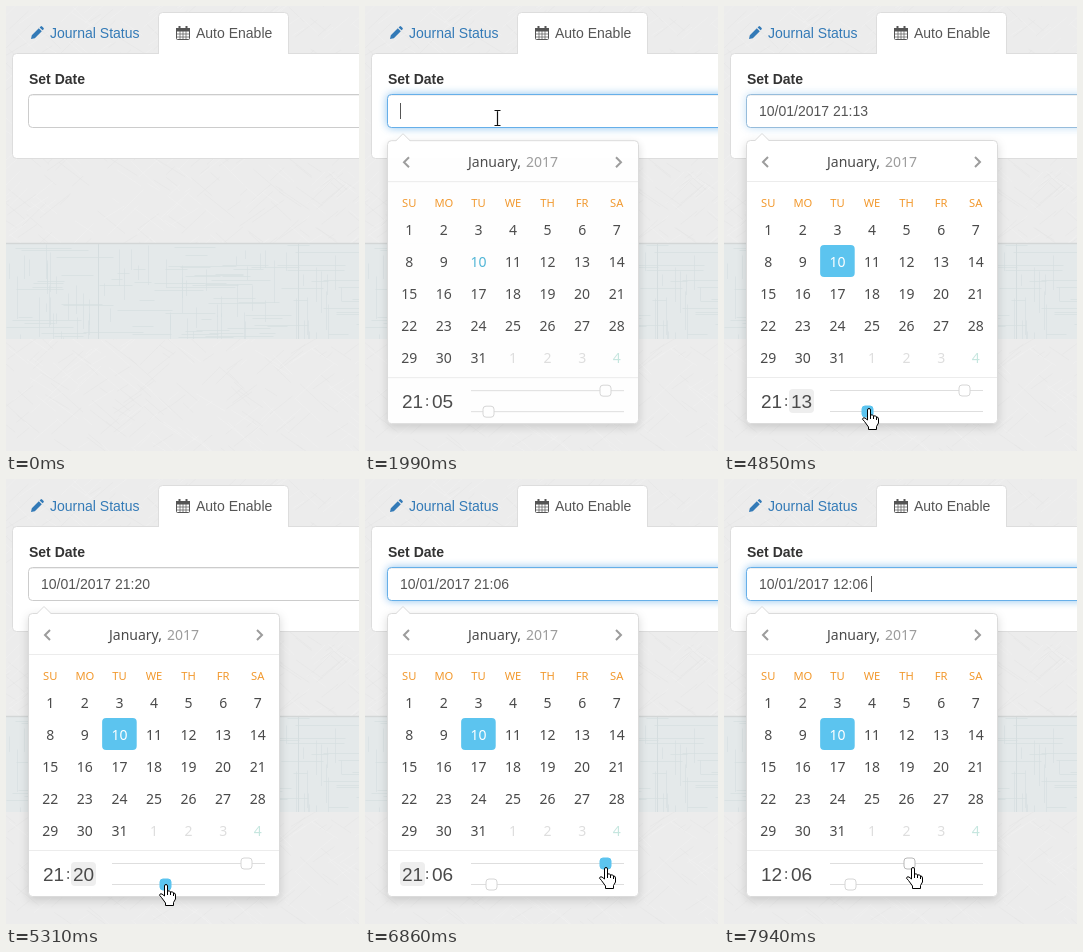
Write an HTML page that moves like this. It is 353 px wide and 445 px high and loops after 8000 ms.

```html
<!DOCTYPE html>
<html lang="en">
<head>
<meta charset="utf-8">
<title>Date picker</title>
<style>
html, body { margin: 0; width: 100%; height: 100%; overflow: hidden; background: #ececec; }
svg { display: block; font: 14px "Liberation Sans", Arial, sans-serif; }
.cal { font-family: "Noto Sans", "Open Sans", sans-serif; fill: #4a4a4a; }
.card { fill: #fff; stroke: #dbdbdb; filter: drop-shadow(0 3px 5px rgba(0,0,0,.15)); }
.glow { fill: #fff; stroke: #66afe9; filter: drop-shadow(0 0 4px rgba(102,175,233,.75)); }
.time { font: 19px "Liberation Sans", Arial, sans-serif; }
.mid { text-anchor: middle; }
.week { font-size: 11.2px; fill: #f2982c; }
</style>
</head>
<body>
<svg id="stage" width="353" height="445" viewBox="0 0 353 445"></svg>
<script>
const LOOP = 8000, CELL_W = 34.57, CELL_H = 32, GRID_X = 27, GRID_Y = 207;
const BLUE = '#5cc4ef';
const MINUTE_STEP = 141 / 59, HOUR_STEP = 141 / 23, TRACK = 112;
const SHOW = 1760, PICK = 4120;
const MINUTE_DRAG = [4780, 5770], HOUR_DRAG = [6860, 7790];

// time, x, y of the pointer's hot spot
const PATH = [
  [670, 183, 251], [820, 151, 157], [900, 151, 157], [1210, 132, 112],
  [2380, 132, 112], [2760, 150, 222], [3700, 150, 222], [3770, 151, 236],
  [4000, 112, 256], [4170, 112, 256], [4460, 127, 408], [4720, 127, 408],
  [4780, 133, 406], [4850, 144, 402], [5110, 185, 402], [5540, 127, 408],
  [5880, 127, 408], [6160, 200, 387], [6240, 200, 387], [6460, 238, 390],
  [6570, 238, 390], [6630, 240, 388], [6860, 240, 388], [7470, 188, 388]
];

let seed = 11;
const random = () => (seed = seed * 16807 % 2147483647) / 2147483647;
const clamp = (v, lo = 0, hi = 1) => Math.min(hi, Math.max(lo, v));
const ramp = (t, start, length) => clamp((t - start) / length);
const within = (t, [start, end]) => t >= start && t < end;
const pad = n => String(n).padStart(2, '0');
const text = (x, y, s, attrs = '') => `<text x="${x}" y="${y}" ${attrs}>${s}</text>`;
const rect = (x, y, w, h, attrs) => `<rect x="${x}" y="${y}" width="${w}" height="${h}" ${attrs}/>`;
const line = (d, color, attrs = '') => `<path d="${d}" fill="none" stroke="${color}" ${attrs}/>`;

function paper(color) {
  let d = '';
  for (let i = 0; i < 420; i++) {
    const len = 6 + random() * 26, dir = random() < .5 ? -1 : 1;
    d += `M${(random() * 380 - 15).toFixed(1)} ${(random() * 445).toFixed(1)}` +
         `l${len.toFixed(1)} ${(dir * len * (.6 + random() * .4)).toFixed(1)}`;
  }
  return line(d, color, 'opacity=".5"');
}

function linen() {
  let d = '';
  for (let i = 0; i < 150; i++) {
    const x = Math.floor(random() * 353) + .5, y = Math.floor(238 + random() * 94) + .5;
    d += random() < .5 ? `M${x} ${y}h${Math.floor(10 + random() * 60)}`
                       : `M${x} ${y}V${Math.min(333, Math.floor(y + 8 + random() * 35))}`;
  }
  return rect(0, 237, 353, 96, 'fill="#e4e9ea"') + line(d, '#d6dfe1', 'opacity=".65"') +
    line('M92.5 238v95M292.5 238v95', '#d5dddf') + line('M0 237.5h353', '#d3d6d6', 'stroke-width="1.5"');
}

function page() {
  return rect(0, 0, 353, 445, 'fill="#ececec"') + paper('#e4e4e4') + paper('#f2f2f2') + linen() +
    rect(6.5, 47.5, 380, 105, 'rx="4" fill="#fff" stroke="#ddd"') +
    '<path d="M152.5 48.5V10.5q0-4 4-4h122q4 0 4 4v38" fill="#fff"/>' +
    line('M152.5 48V10.5q0-4 4-4h122q4 0 4 4V48', '#ddd') +
    '<path d="M25 33l.8-3.8 7-7 3 3-7 7zM33.6 21.4l1-1q.8-.6 1.5 0l1.5 1.5q.6.7 0 1.4l-1 1z" fill="#337ab7"/>' +
    text(44, 32, 'Journal Status', 'fill="#337ab7"') +
    rect(170.5, 22.5, 13, 11, 'rx="1" fill="none" stroke="#555"') +
    rect(170, 22, 14, 3.5, 'fill="#555"') + rect(172.5, 20, 2, 4, 'fill="#555"') + rect(179.5, 20, 2, 4, 'fill="#555"') +
    line('M174 25v9M177 25v9M180 25v9M170 28h14M170 31h14', '#555', 'stroke-width=".7"') +
    text(190, 32, 'Auto Enable', 'fill="#555"') +
    text(23, 78, 'Set Date', 'fill="#333" font-weight="bold"') +
    rect(22.5, 88.5, 400, 33, 'rx="4" fill="#fff" stroke="#ccc"') +
    rect(22.5, 88.5, 400, 33, 'rx="4" class="glow" id="glow"') +
    line('M25 89.5h340', '#000', 'opacity=".06"') +
    text(35, 110, '', 'fill="#555" id="value"') + line('M0 97v16', '#555', 'id="caret"');
}

function calendar() {
  let days = '';
  for (let i = 0; i < 35; i++) {
    const x = GRID_X + CELL_W * (i % 7 + .5), y = GRID_Y + 22 + CELL_H * Math.floor(i / 7);
    const fill = i === 34 ? '#c6e6df' : i > 30 ? '#dedede' : '#4a4a4a';
    days += text(x, y, i > 30 ? i - 30 : i + 1, `class="mid" fill="${fill}" id="day${i}"`);
  }
  const week = ['SU', 'MO', 'TU', 'WE', 'TH', 'FR', 'SA']
    .map((d, i) => text(GRID_X + CELL_W * (i + .5), 201, d, 'class="mid week"')).join('');
  const cell = id => rect(0, 0, CELL_W, CELL_H, `rx="4" id="${id}"`);
  const knob = id => rect(-5.5, -5.5, 11, 11, `rx="3" id="${id}"`);
  return '<g class="cal" id="cal">' +
    rect(22.5, 134.5, 251, 283, 'rx="4" class="card"') +
    '<path d="M31 135l7-7 7 7v1H31z" fill="#fff"/>' + line('M31 134.5l7-7 7 7', '#dbdbdb') +
    line('M23 175.5h250M23 371.5h250', '#ececec') +
    line('M44 151l-5 5 5 5M251 151l5 5-5 5', '#9c9c9c', 'stroke-width="2"') +
    text(103, 161, 'January,') + text(161, 161, '2017', 'fill="#9c9c9c"') + week +
    cell('hover') + cell('picked') + days +
    rect(35, 383, 25, 24, 'rx="4" fill="#eee" id="hourMark"') +
    rect(65, 383, 25, 24, 'rx="4" fill="#eee" id="minuteMark"') +
    text(37, 402, '', 'class="time" id="hours"') + text(60.3, 400, ':') +
    text(67, 402, '', 'class="time" id="minutes"') +
    line('M106 384.5h153M106 405.5h153', '#dedede') +
    knob('hourKnob') + knob('minuteKnob') + '</g>';
}

function pointers() {
  const beam = 'M-3 -7.5h2.5l.5.5.5-.5h2.500M0-7V7M-3 7.500h2.500l.5-.5.5.5h2.500';
  return '<g id="beam">' + line(beam, '#111', 'stroke-width="1.2"') + '</g>' +
    '<path id="arrow" d="M.5.5V16.500l3.700-3.500 2.500 5.500 2.300-1-2.500-5.500h5z" fill="#fff" stroke="#000"/>' +
    '<g id="hand" stroke="#000" stroke-linejoin="round"><path fill="#fff" ' +
    'd="M5.500 2Q5.500.5 7 .5T8.500 2V7Q11 6.200 11.500 8Q14 7.200 14.500 9Q16.500 8.800 16.500 11V15L14.500 18.500V21.500H6.500V19L2.500 13.500L.5 11.200Q1 9 3 10L5.500 12Z"/>' +
    line('M8.500 7v4M11.500 8v3M14.500 9v3', '#000') + '</g>';
}

document.getElementById('stage').innerHTML = page() + calendar() + pointers();
const ui = {};
document.querySelectorAll('[id]').forEach(el => ui[el.id] = el);
const set = (id, attrs) => { for (const k in attrs) ui[id].setAttribute(k, attrs[k]); };
const show = (id, on) => set(id, { visibility: on ? 'visible' : 'hidden' });
const move = (id, x, y) => set(id, { transform: `translate(${x} ${y})` });

function pointerAt(t) {
  const i = PATH.findIndex(p => p[0] > t);
  if (i === 0) return PATH[0].slice(1);
  if (i < 0) return PATH[PATH.length - 1].slice(1);
  const [t0, x0, y0] = PATH[i - 1], [t1, x1, y1] = PATH[i];
  const k = ramp(t, t0, t1 - t0), e = k * k * (3 - 2 * k);
  return [x0 + (x1 - x0) * e, y0 + (y1 - y0) * e];
}

const dragged = (t, [start, end], step, before) =>
  t < start ? before : Math.round((pointerAt(Math.min(t, end))[0] - TRACK) / step);

function drawKnob(id, value, step, y, active, x, py) {
  const cx = TRACK + value * step;
  const over = Math.abs(x - cx) < 7 && Math.abs(py - y) < 7;
  move(id, Math.round(cx - .5) + .5, y);
  set(id, { fill: active ? BLUE : '#fff', stroke: active ? BLUE : over ? '#b8b8b8' : '#d6d6d6' });
}

function render(t) {
  const [x, y] = pointerAt(t);
  const fade = ramp(t, SHOW, 300), shown = 1 - (1 - fade) ** 2.6;
  const open = t >= SHOW + 300, picked = t >= PICK;
  const minuteOn = within(t, MINUTE_DRAG), hourOn = within(t, HOUR_DRAG);
  const minutes = dragged(t, MINUTE_DRAG, MINUTE_STEP, 5);
  const hours = dragged(t, HOUR_DRAG, HOUR_STEP, 21);

  const focus = ramp(t, SHOW, 150) - ramp(t, MINUTE_DRAG[0], 150) + ramp(t, MINUTE_DRAG[1], 150)
    - ramp(t, HOUR_DRAG[0], 150) + ramp(t, HOUR_DRAG[1], 150);
  set('glow', { opacity: focus });
  ui.value.textContent = picked ? `10/01/2017 ${pad(hours)}:${pad(minutes)}` : '';
  show('caret', within(t, [SHOW, MINUTE_DRAG[0]]) || within(t, [MINUTE_DRAG[1], 6390]) || t >= HOUR_DRAG[1]);
  move('caret', picked ? 147.5 : 35.5, 0);

  set('cal', { opacity: shown });
  move('cal', 0, 8 * (1 - shown));
  const col = Math.floor((x - GRID_X) / CELL_W), row = Math.floor((y - GRID_Y) / CELL_H);
  const onDay = open && col >= 0 && col < 7 && row >= 0 && row < 5;
  show('hover', onDay);
  set('hover', { fill: '#f0f0f0' });
  if (onDay) move('hover', GRID_X + col * CELL_W, GRID_Y + row * CELL_H);
  show('picked', picked);
  set('picked', { fill: BLUE });
  move('picked', GRID_X + 2 * CELL_W, GRID_Y + CELL_H);
  set('day9', { fill: picked ? '#fff' : '#4eb5d6' });

  ui.hours.textContent = pad(hours);
  ui.minutes.textContent = pad(minutes);
  show('hourMark', hourOn);
  show('minuteMark', minuteOn);
  drawKnob('hourKnob', hours, HOUR_STEP, 384.5, hourOn, x, y);
  drawKnob('minuteKnob', minutes, MINUTE_STEP, 405.5, minuteOn, x, y);

  const visible = t >= PATH[0][0];
  const onInput = y > 88 && y < 122;
  const onTitle = open && x > 95 && x < 201 && y > 140 && y < 171;
  const onSlider = open && x > 106 && x < 259 && y > 377 && y < 413;
  const onHand = onDay || onTitle || onSlider;
  show('beam', visible && onInput);
  show('hand', visible && onHand);
  show('arrow', visible && !onInput && !onHand);
  const px = Math.round(x), py = Math.round(y);
  move('beam', px + .5, py);
  move('arrow', px, py);
  move('hand', px - 6, py);
}

function tick() {
  render(performance.now() % LOOP);
  requestAnimationFrame(tick);
}
tick();
</script>
</body>
</html>
```
